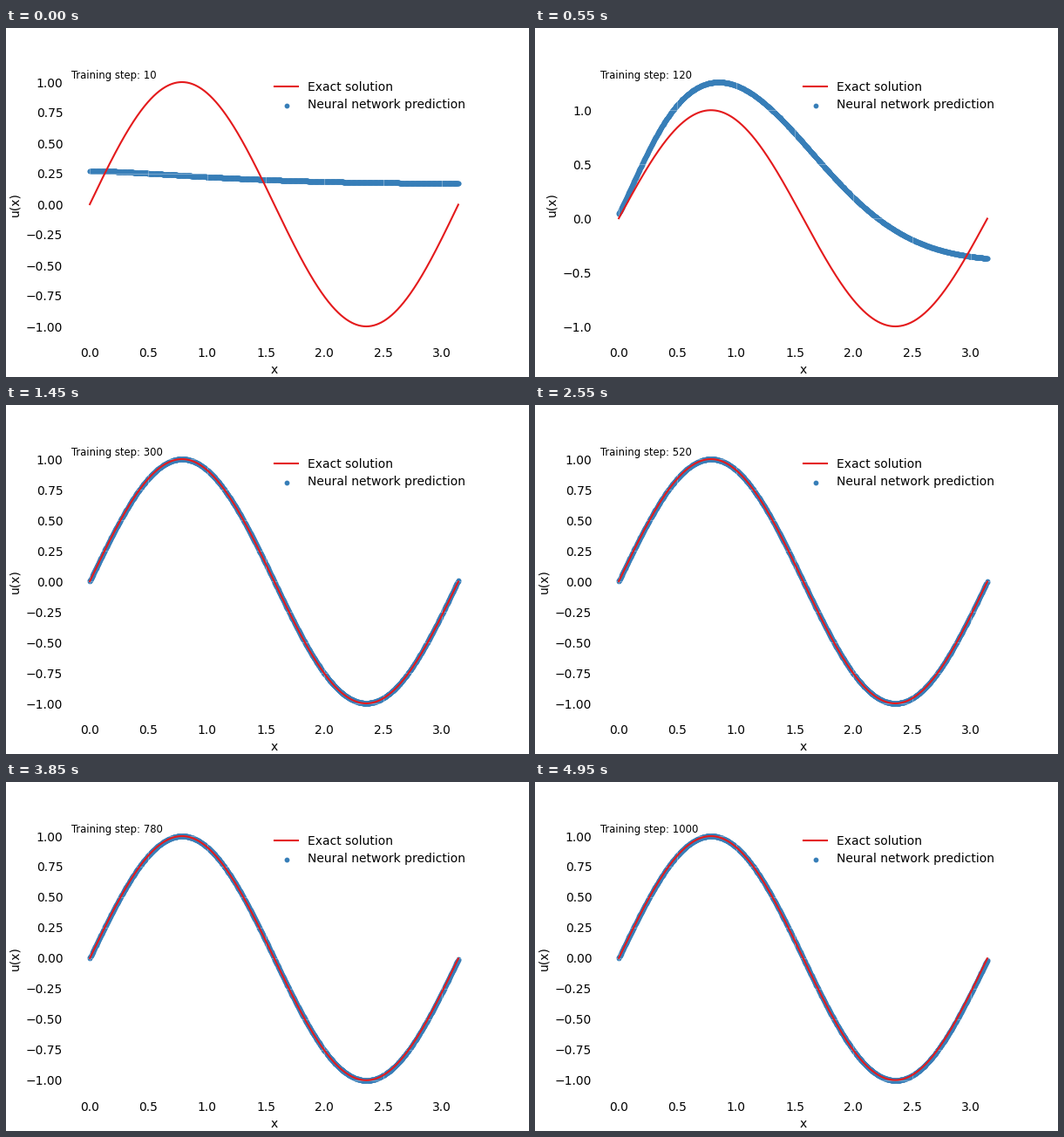
These frames come from a looping animation (600x400 px, 5 s). A matplotlib script:

```python
import numpy as np
import matplotlib.pyplot as plt
from matplotlib.animation import FuncAnimation

RED, BLUE = "#e41a1c", "#377eb8"
FRAMES, INTERVAL = 100, 50

plt.rcParams["font.family"] = "DejaVu Sans"

x = np.linspace(0, 3.14, 1200)
u = x / np.pi
exact = np.sin(2 * x)

# Early guess: a nearly flat, slowly falling line
flat = 0.168 + 0.107 * np.exp(-(x / 1.35) ** 1.5)

# First hump: a bell whose width grows to the right
width = 0.74 + 0.4 * np.tanh(1.2 * x)
one_hump = -0.4 + 1.66 * np.exp(-((x - 0.85) / width) ** 2)

# Both humps: the exact curve plus a broad error in the middle
two_humps = exact + 0.025 + 0.575 * np.tanh(1.4 * np.sin(np.pi * u ** 1.45))


def converged(step):
    """Exact curve with a small drift that grows towards the right end."""
    drift = 0.01 - 0.025 * (step - 300) / 700
    return exact + drift * u ** 6


def blend(a, b, s):
    return a + (b - a) * s


def predict(step):
    if step <= 120:
        s = (step - 10) / 110
        return blend(flat, one_hump, s * s * (3 - 2 * s))
    if step <= 220:
        return blend(one_hump, two_humps, (step - 120) / 100)
    if step <= 300:
        s = (step - 220) / 80
        return blend(two_humps, converged(300), 1 - (1 - s) ** 2)
    return converged(step)


fig, ax = plt.subplots(figsize=(6, 4), dpi=100)
ax.set_frame_on(False)
ax.tick_params(length=0, pad=7)
ax.grid(color="white", alpha=0.3, linewidth=0.8)
ax.set_axisbelow("line")
ax.set(xlabel="x", ylabel="u(x)")

ax.plot(x, exact, color=RED, label="Exact solution")
dots = ax.scatter(x, flat, s=10, color=BLUE, label="Neural network prediction")
ax.legend(loc="upper right", frameon=False)
caption = ax.text(0, 1, "", transform=ax.transAxes, size="small", va="top")


def update(i):
    step = 10 * (i + 1)
    y = predict(step)
    dots.set_offsets(np.column_stack([x, y]))
    low, high = min(y.min(), -1), max(y.max(), 1)
    pad = 0.05 * (high - low)
    ax.set_ylim(low - pad, high + pad)
    caption.set_text(f"Training step: {step}")
    return dots, caption


anim = FuncAnimation(fig, update, frames=FRAMES, interval=INTERVAL, repeat=True)
plt.show()
```
